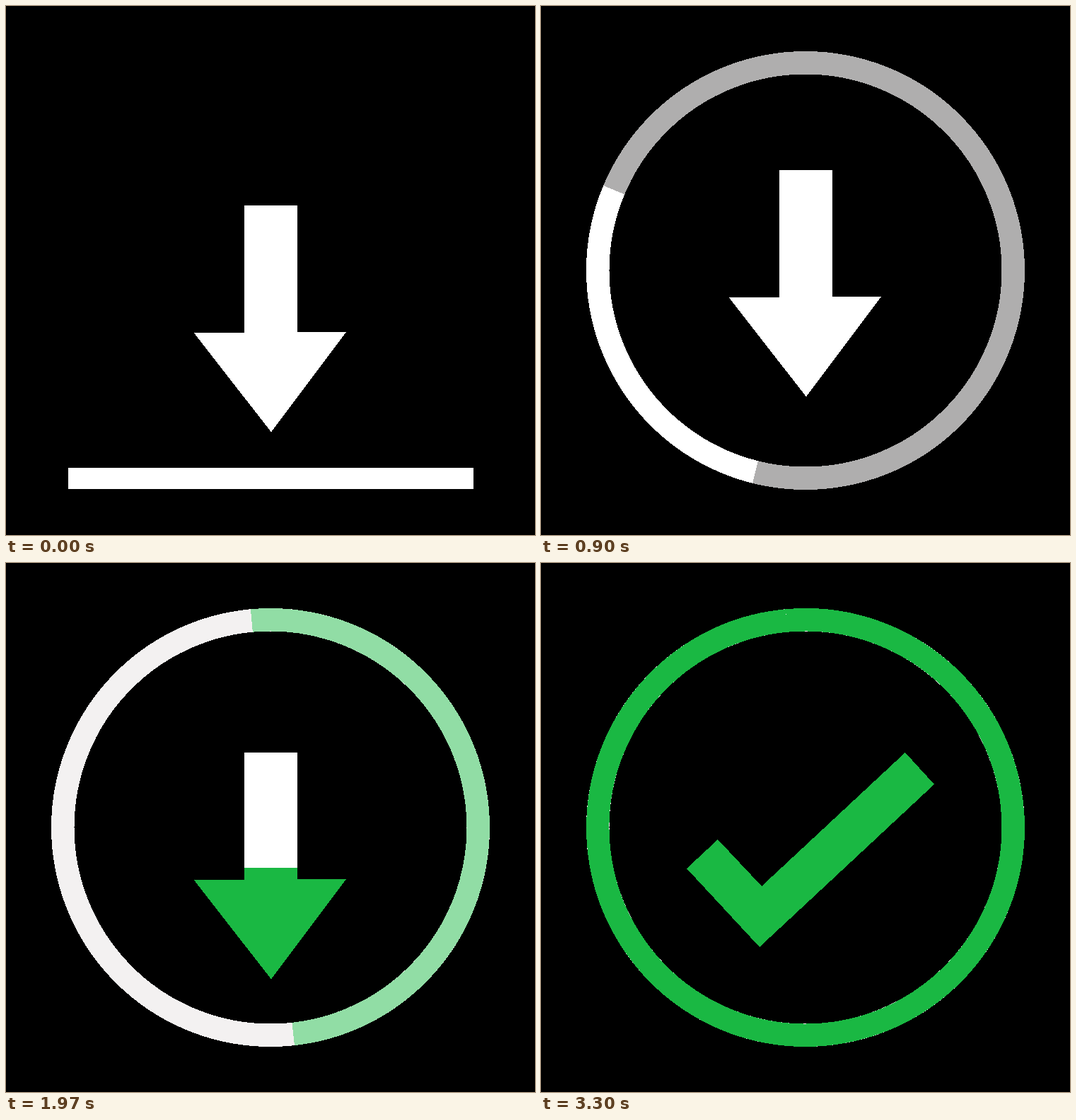
An HTML page for the animation above (5000 ms loop, 748 px wide and 748 px high).

```html
<!DOCTYPE html>
<html lang="en">
<head>
<meta charset="utf-8">
<title>Download</title>
<style>
  html, body { margin: 0; width: 100%; height: 100%; overflow: hidden; background: #000; }
  svg { display: block; width: 100%; height: 100%; }
</style>
</head>
<body>
<svg viewBox="0 0 748 748" shape-rendering="crispEdges">
  <clipPath id="level"><rect id="levelBox" width="748" height="748"/></clipPath>
  <g fill="none" stroke-width="32.5">
    <circle id="track" cx="374" cy="374" r="293.75" stroke="#f3f1f1"/>
    <path id="sweep" stroke="#fff"/>
    <path id="progress"/>
  </g>
  <polygon id="arrow" fill="#fff"/>
  <polygon id="filled" fill="#1ab843" clip-path="url(#level)"/>
</svg>
<script>
const $ = id => document.getElementById(id);
const LOOP = 5000, LAST = 99;
const C = 374, R = 293.75, START = -5.2;
const GREEN = [26, 184, 67];

const clamp = x => Math.min(1, Math.max(0, x));
const lerp = (a, b, p) => a + (b - a) * p;
const span = (f, from, to) => clamp((f - from) / (to - from));
const linear = p => p;
const easeOut = p => 1 - (1 - p) ** 2;
const easeInOut = p => (1 - Math.cos(Math.PI * p)) / 2;

// Each key is [frame, value, easing towards this key].
function track(f, keys) {
  let [from, value] = keys[0];
  for (const [to, next, ease = linear] of keys.slice(1)) {
    if (f < to) return lerp(value, next, ease(span(f, from, to)));
    [from, value] = [to, next];
  }
  return value;
}

// Degrees run clockwise from the top.
function onRing(deg) {
  const a = deg * Math.PI / 180;
  return [C + R * Math.sin(a), C - R * Math.cos(a)];
}

function arc(from, to) {
  const sweep = Math.min(to - from, 359.99);
  if (sweep <= 0) return "";
  return `M${onRing(from)}A${R} ${R} 0 ${sweep > 180 ? 1 : 0} 1 ${onRing(from + sweep)}`;
}

function bentBar(p) {
  const points = [];
  for (let i = 0; i <= 48; i++) {
    const u = i / 24 - 1;
    const [x, y] = onRing(180 - 90 * u);
    points.push([lerp(374.5 + 286.5 * u, x, p), lerp(668.2, y, p)]);
  }
  return "M" + points.join("L");
}

const arrowShape = [
  [337, 0], [411.5, 0], [411.5, 179.5], [481, 179],
  [375, 320.5], [266, 180.5], [266, 180.5], [337, 180]
];
const checkShape = [
  [515, 268], [556, 313], [474, 389.4], [391, 466.7],
  [309, 543], [206, 432], [250, 391], [312, 457]
];

const arrowTop = f => track(f, [
  [0, 282], [12, 296], [17, 156, easeInOut], [27, 232, easeInOut],
  [47, 256], [59, 268], [67, 270, easeOut], [76.5, 156, easeInOut]
]);

function drawRing(f) {
  $("track").setAttribute("opacity", easeOut(span(f, 18, 37)));

  const bend = easeInOut(span(f, 12, 19));
  const tail = track(f, [[19, 90], [27, 194], [39, 354.8]]);
  const head = track(f, [[19, 270], [27, 292.8], [39, 354.8]]);
  $("sweep").setAttribute("d", bend < 1 ? bentBar(bend) : arc(tail, head));
  $("sweep").setAttribute("stroke-width", lerp(30.5, 32.5, bend));

  const tint = span(f, 41.9, 77.6);
  const color = GREEN.map(c => Math.round(lerp(255, c, tint)));
  $("progress").setAttribute("stroke", `rgb(${color})`);
  $("progress").setAttribute("d", arc(START, START + 360 * span(f, 38.5, 79.75)));
}

function drawArrow(f) {
  const top = arrowTop(f);
  const morph = easeInOut(span(f, 77, 95));
  const points = arrowShape.map(([x, y], i) => [
    lerp(x, checkShape[i][0], morph),
    lerp(y + top, checkShape[i][1], morph)
  ]).join(" ");
  const fill = span(f, 45.2, 73.3);
  $("arrow").setAttribute("points", fill < 1 ? points : "");
  $("filled").setAttribute("points", fill > 0 ? points : "");
  $("levelBox").setAttribute("y", fill < 1 ? top + 320.5 * (1 - fill) : 0);
}

function draw(ms) {
  const f = Math.min(LAST, Math.floor(ms * 0.03 + 0.201));
  drawRing(f);
  drawArrow(f);
}

const begin = performance.now();
function tick() {
  draw((performance.now() - begin) % LOOP);
  requestAnimationFrame(tick);
}
draw(0);
requestAnimationFrame(tick);
</script>
</body>
</html>
```
